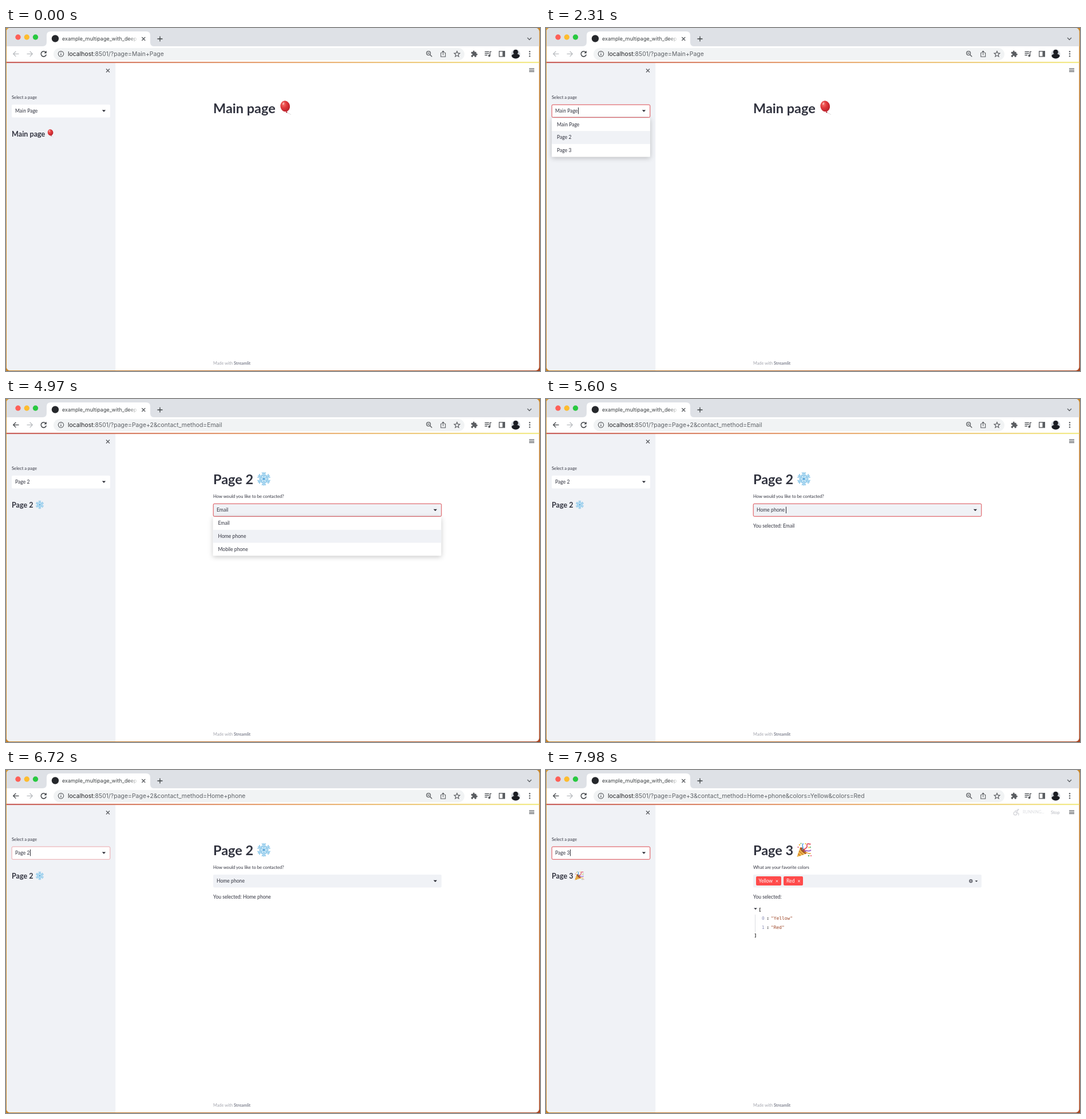
Write an HTML page that moves like this. It is 933x600 px and loops after 8000 ms.

```html
<!DOCTYPE html>
<html lang="en">
<head>
<meta charset="utf-8">
<title>Multipage app</title>
<style>
  html, body { margin: 0; width: 100%; height: 100%; overflow: hidden; background: #c17a26; }
  svg { display: block; width: 933px; height: 600px; }
  text { font-family: Lato, "Open Sans", sans-serif; font-size: 8.6px; fill: #31333f; white-space: pre; }
  .h1 { font-size: 23.5px; font-weight: 700; }
  .h2 { font-size: 12.6px; font-weight: 700; }
  .label { font-size: 7.65px; }
  .foot { font-size: 7.3px; fill: #a3a5ad; }
  .foot .name { font-weight: 700; fill: #808390; }
  .ui { font-family: Inter, Roboto, sans-serif; }
  .url { font-size: 10.45px; fill: #5f6368; }
  .url .host { fill: #202124; }
  .tab { font-size: 9.05px; fill: #3c4043; }
  .mono { font-family: "DejaVu Sans Mono", monospace; font-size: 7.9px; fill: #9c4526; }
  .mono .key { fill: #8b8fb8; }
  .mono .mark { fill: #222; font-weight: 700; }
  .icon { fill: none; stroke: #5a5d61; stroke-width: 1.3; }
  .solid { fill: #5a5d61; stroke: none; }
  .arrow { fill: #262730; }
  .focus { fill: none; stroke: #dc4a50; }
  .caret { stroke: #262730; stroke-width: 1; }
  .menu { filter: drop-shadow(0 2px 4px rgba(0, 0, 0, .22)); }
  .tag { fill: #ff4b4b; }
  .tagText { fill: #fff; }
</style>
</head>
<body>
<svg viewBox="0 0 933 600" xmlns="http://www.w3.org/2000/svg">
  <defs>
    <linearGradient id="desk" x2="1" y2="1">
      <stop stop-color="#d39a3c"/><stop offset=".5" stop-color="#c5842a"/><stop offset="1" stop-color="#a8441f"/>
    </linearGradient>
    <linearGradient id="strip">
      <stop stop-color="#c4504c"/><stop offset=".5" stop-color="#e59a62"/><stop offset="1" stop-color="#f2ea7c"/>
    </linearGradient>
    <linearGradient id="tabFade">
      <stop offset=".1" stop-color="#fff" stop-opacity="0"/><stop offset="1" stop-color="#fff"/>
    </linearGradient>
    <radialGradient id="rubber" cx=".38" cy=".3" r=".75">
      <stop stop-color="#f5736c"/><stop offset=".45" stop-color="#e0393c"/><stop offset="1" stop-color="#b51f2a"/>
    </radialGradient>
    <linearGradient id="gold">
      <stop stop-color="#e9a93a"/><stop offset="1" stop-color="#f8d568"/>
    </linearGradient>
    <clipPath id="win"><rect x="1" width="930.5" height="599" rx="6"/></clipPath>
    <clipPath id="face"><circle cx="890.5" cy="45.5" r="8"/></clipPath>

    <g id="balloon">
      <path d="M12 20C13 24 18 21 19.500 25" fill="none" stroke="#cfcfd2" stroke-width=".8"/>
      <ellipse cx="9.700" cy="9.800" rx="8.300" ry="9.600" fill="url(#rubber)" transform="rotate(-12 9.700 9.800)"/>
      <path d="M10.700 21.500L12 18.500L14 20.800Z" fill="#b51f2a"/>
      <ellipse cx="6.700" cy="5.200" rx="1.500" ry="2.300" fill="#fff" opacity=".45" transform="rotate(25 6.700 5.200)"/>
    </g>
    <g id="arm" fill="none" stroke="#8ac6e9" stroke-width="1.700" stroke-linecap="round">
      <path d="M0 0V-11.200M-2.900 -10.500L0 -7.800L2.900 -10.500M-2.700 -6.800L0 -4.200L2.700 -6.800"/>
      <path d="M0 -1V-10" stroke="#dff2fc" stroke-width=".5"/>
    </g>
    <g id="snow">
      <g transform="translate(12 12)">
        <circle r="8.500" fill="#d9effa"/>
        <use href="#arm"/><use href="#arm" transform="rotate(60)"/><use href="#arm" transform="rotate(120)"/>
        <use href="#arm" transform="rotate(180)"/><use href="#arm" transform="rotate(240)"/><use href="#arm" transform="rotate(300)"/>
        <circle r="2" fill="#5fa9dc"/>
      </g>
    </g>
    <g id="party">
      <path d="M.5 25L6 8.500C11 10 15 14 17 19.500Z" fill="url(#gold)"/>
      <path d="M4 14.500L11.500 21.500M2.300 19.500L6.500 23.200M6 9.500L15.500 19.800" stroke="#c9732c" stroke-width="1.300"/>
      <ellipse cx="11.500" cy="14" rx="7.400" ry="3" fill="#a5552a" transform="rotate(45 11.500 14)"/>
      <g fill="none" stroke-width="1.700" stroke-linecap="round">
        <path d="M10 12C13 9 8 6 11 2" stroke="#4f9ce0"/>
        <path d="M13 13C15 8 19 11 18 5.500S22 3 24 2.500" stroke="#e2495c"/>
        <path d="M14 15C18 12 19 17 24.500 13.500" stroke="#9b5fc8"/>
        <path d="M15 17C19 17 19 20 24 19" stroke="#eda43c"/>
      </g>
      <g fill="#f4bf3f"><circle cx="5" cy="4" r="1.300"/><circle cx="15.500" cy="2" r="1.200"/><circle cx="21.500" cy="8.500" r="1.300"/></g>
      <g fill="#5cae62"><circle cx="7.500" cy="1.500" r="1"/><circle cx="24" cy="8" r="1.100"/><circle cx="21" cy="23" r="1.300"/></g>
      <g fill="#e2495c"><circle cx="2.500" cy="8" r="1.100"/><circle cx="25" cy="23" r="1"/></g>
    </g>
    <path id="down" class="arrow" d="M-3.200 -1.500H3.200L0 1.700Z"/>
    <path id="cross" d="M-3 -3L3 3M3 -3L-3 3"/>
  </defs>

  <rect width="933" height="600" fill="url(#desk)"/>
  <g clip-path="url(#win)">
    <rect width="933" height="600" fill="#fff"/>

    <!-- browser frame -->
    <rect width="933" height="32" fill="#dee1e6"/>
    <circle cx="21" cy="16" r="4.700" fill="#fe5f57"/>
    <circle cx="36.300" cy="16" r="4.700" fill="#febc2e"/>
    <circle cx="51.500" cy="16" r="4.700" fill="#28c840"/>
    <path d="M64 32Q71 32 71 25V13Q71 6 78 6H245Q252 6 252 13V25Q252 32 259 32Z" fill="#fff"/>
    <circle cx="86" cy="18.500" r="6.200" fill="#25272b"/>
    <text class="ui tab" x="98" y="22">example_multipage_with_deep</text>
    <rect x="212" y="10" width="19" height="17" fill="url(#tabFade)"/>
    <rect x="231" y="10" width="5" height="17" fill="#fff"/>
    <g class="icon">
      <use href="#cross" transform="translate(240.300 19)"/>
      <path d="M264.500 19H273.500M269 14.500V23.500" stroke="#3c4043"/>
      <path d="M911 17L914.500 20.500L918 17"/>
    </g>
    <rect x="83" y="35" width="718" height="21.500" rx="10.700" fill="#f1f3f4"/>
    <g class="icon">
      <path id="back" d="M22.500 45.300H13M17.300 40.700L12.700 45.300L17.300 49.900"/>
      <path d="M36.500 45.300H46M41.700 40.700L46.300 45.300L41.700 49.900" stroke="#b9bcc0"/>
      <path d="M69.300 42.300A4.600 4.600 0 1 0 70.300 46.500" stroke="#45484c" stroke-width="1.500"/>
      <path d="M70.800 39.800V44.200H66.400Z" fill="#45484c" stroke="none"/>
      <circle cx="96" cy="45.300" r="4.700" stroke-width="1.100"/>
      <path d="M96 44.700V48M96 42.400V43.600"/>
      <circle cx="738.200" cy="44" r="3.400"/><path d="M740.800 46.700L744.300 50.200M736.600 44H739.800"/>
      <path d="M761.500 43.500H759.800V50.200H767.700V43.500H766M763.700 47.500V40.700M761.500 42.500L763.700 40.300L765.900 42.500" stroke-width="1.100"/>
      <path d="M788 40.500L789.400 43.900L793 44.200L790.200 46.500L791.100 50L788 48.100L784.900 50L785.800 46.500L783 44.200L786.600 43.900Z" stroke-width="1.100"/>
      <path class="solid" transform="translate(811.700 39) scale(.53)" d="M20.500 11H19V7c0-1.100-.9-2-2-2h-4V3.500a2.500 2.500 0 0 0-5 0V5H4c-1.100 0-2 .9-2 2v3.800h1.500c1.490 0 2.700 1.210 2.700 2.700s-1.210 2.700-2.700 2.700H2V20c0 1.100.9 2 2 2h3.800v-1.500c0-1.490 1.210-2.700 2.700-2.700s2.700 1.210 2.700 2.700V22H17c1.100 0 2-.9 2-2v-4h1.500a2.500 2.500 0 0 0 0-5z"/>
      <path d="M836.500 41.500H844M836.500 44.500H844M836.500 47.500H841M845.700 49V41.300H848.200"/>
      <circle class="solid" cx="844.400" cy="48.500" r="1.900"/>
      <rect x="861.700" y="40.700" width="9.600" height="9.200"/>
      <path class="solid" d="M867.500 40.500H872V50H867.500Z"/>
      <g class="solid"><circle cx="915" cy="41.300" r="1.200"/><circle cx="915" cy="45.300" r="1.200"/><circle cx="915" cy="49.300" r="1.200"/></g>
    </g>
    <g clip-path="url(#face)">
      <rect x="882" y="37" width="17" height="17" fill="#d3d7dd"/>
      <g fill="#1a1c22"><circle cx="890.500" cy="42" r="4.300"/><path d="M882 54Q882 45 890.500 45T899 54Z"/></g>
    </g>
    <text class="ui url" x="108" y="49"><tspan class="host">localhost</tspan>:8501/?page=<tspan id="query"></tspan></text>

    <!-- app -->
    <rect y="60" width="191.300" height="540" fill="#f0f2f6"/>
    <rect y="59.200" width="933" height="2" fill="url(#strip)"/>
    <use href="#cross" class="icon" transform="translate(178 74.500)"/>
    <path d="M914 71.200H923M914 73.800H923M914 76.400H923" class="icon" stroke-width="1.200"/>
    <text class="label" x="10" y="124">Select a page</text>
    <rect x="10" y="134" width="172" height="22.500" rx="2" fill="#fff"/>
    <rect id="focus1" class="focus" x="10.200" y="134.200" width="171.600" height="22.100" rx="2"/>
    <text id="value1" x="16" y="148"></text>
    <use href="#down" x="171" y="145"/>
    <path id="caret1" class="caret" d="M.5 139V150.500"/>
    <text id="side" class="h2" x="10" y="189.500"></text>
    <use id="sideIcon"/>
    <text id="title" class="h1" x="362" y="149"></text>
    <use id="titleIcon"/>

    <g id="contact">
      <text class="label" x="362" y="173">How would you like to be contacted?</text>
      <rect x="362" y="183" width="399" height="22.500" rx="2" fill="#f0f2f6"/>
      <rect id="focus2" class="focus" x="362.200" y="183.200" width="398.600" height="22.100" rx="2"/>
      <text id="value2" x="368" y="197.200"></text>
      <use href="#down" x="750" y="194.300"/>
      <path id="caret2" class="caret" d="M.5 188.500V200"/>
      <text id="chosen" x="362" y="225"></text>
    </g>

    <g id="colors">
      <text class="label" x="362" y="173">What are your favorite colors</text>
      <rect x="362" y="183" width="399" height="22.500" rx="2" fill="#f0f2f6"/>
      <rect class="tag" x="367" y="186" width="44" height="16" rx="2"/>
      <rect class="tag" x="415" y="186" width="34" height="16" rx="2"/>
      <text class="tagText" x="371.500" y="197.200">Yellow</text>
      <text class="tagText" x="420" y="197.200">Red</text>
      <g stroke="#fff" stroke-width="1.600">
        <use href="#cross" transform="translate(403.500 194.400) scale(.6)"/>
        <use href="#cross" transform="translate(442 194.400) scale(.6)"/>
      </g>
      <circle cx="742.300" cy="194.300" r="3.200" fill="#6c6e77"/>
      <use href="#cross" stroke="#fff" stroke-width="2" transform="translate(742.300 194.300) scale(.4)"/>
      <use href="#down" transform="translate(752 194.500) scale(.75)"/>
      <text x="362" y="225">You selected:</text>
      <use href="#down" transform="translate(366 242.700) scale(.85)"/>
      <path d="M365.500 253V283" stroke="#dcdde2"/>
      <text class="mono" y="247"><tspan class="mark" x="371.500">[</tspan></text>
      <text class="mono" y="261.500"><tspan class="key" x="377">0</tspan><tspan class="mark" x="385.300">:</tspan><tspan x="393">"Yellow"</tspan></text>
      <text class="mono" y="277.500"><tspan class="key" x="377">1</tspan><tspan class="mark" x="385.300">:</tspan><tspan x="393">"Red"</tspan></text>
      <text class="mono" y="292"><tspan class="mark" x="363.500">]</tspan></text>
    </g>

    <text class="foot" x="362" y="589">Made with <tspan class="name">Streamlit</tspan></text>

    <g id="status">
      <g fill="none" stroke="#d2d3d8" stroke-width="1.200">
        <circle cx="820" cy="76" r="2.900"/>
        <path d="M819 71.500L824 70.500L822.500 74.500L826 76L825.500 79.500"/>
        <circle cx="825" cy="69.300" r=".8"/>
      </g>
      <text x="833" y="75.500" style="font-size:7px;fill:#dcdde1">RUNNING...</text>
      <text x="882" y="76.500" style="font-size:7.800px;fill:#b4b6bd">Stop</text>
    </g>

    <g id="menu1"></g>
    <g id="menu2"></g>
  </g>
</svg>

<script>
const LOOP = 8000, STEP = 70;
const $ = id => document.getElementById(id);

const pages = [
  { name: 'Main Page', title: 'Main page', icon: 'balloon', big: [478, 127], small: [72, 177], scale: .58 },
  { name: 'Page 2', title: 'Page 2', icon: 'snow', big: [438.5, 127.7], small: [51.5, 177.5], scale: .62 },
  { name: 'Page 3', title: 'Page 3', icon: 'party', big: [438, 127], small: [50, 177], scale: .63 }
];
const methods = ['Email', 'Home phone', 'Mobile phone'];

function buildMenu(id, x, y, width, options) {
  const row = 22.67;
  $(id).innerHTML =
    `<rect class="menu" x="${x}" y="${y}" width="${width}" height="${row * 3}" rx="1.5" fill="#fff"/>` +
    `<rect class="hover" x="${x}" y="${y}" width="${width}" height="${row}" fill="#f0f2f6"/>` +
    options.map((o, i) => `<text x="${x + 9}" y="${y + 14.2 + i * row}">${o}</text>`).join('');
  const hover = $(id).querySelector('.hover');
  return i => hover.setAttribute('y', y + i * row);
}
const hover1 = buildMenu('menu1', 10, 157.5, 172, pages.map(p => p.name));
const hover2 = buildMenu('menu2', 361.5, 206.2, 399, methods);
hover2(1);

const ramp = (t, a, b) => Math.min(1, Math.max(0, (t - a) / (b - a)));
const within = (t, a, b) => t >= a && t < b;
// A popover is half drawn for one step on opening and closing.
const popover = (t, a, b) =>
  within(t, a, a + STEP) ? .7 : within(t, a, b) ? 1 : within(t, b, b + STEP) ? .4 : 0;
const pulse = (t, a) => within(t, a, a + STEP) ? 1 : within(t, a + STEP, a + 2 * STEP) ? .5 : 0;

function setText(id, s) { if ($(id).textContent !== s) $(id).textContent = s; }
function setAlpha(id, a) { $(id).setAttribute('opacity', a); }
function setIcon(id, icon, [x, y], scale) {
  $(id).setAttribute('href', '#' + icon);
  $(id).setAttribute('transform', `translate(${x} ${y}) scale(${scale})`);
}
function setCaret(id, x, on) {
  $(id).setAttribute('transform', `translate(${x})`);
  setAlpha(id, on ? 1 : 0);
}

function draw(now) {
  const t = Math.floor(now % LOOP / STEP) * STEP;
  const picked = t < 3080 ? 0 : t < 7770 ? 1 : 2;
  const shown = t < 3220 ? 0 : t < 7910 ? 1 : 2;
  const value = methods[t < 5530 ? 0 : 1];
  const method = methods[t < 5670 ? 0 : 1];
  const page = pages[shown];

  const query = page.name.replace(' ', '+') +
    (shown ? '&contact_method=' + method.replace(' ', '+') : '') +
    (shown === 2 ? '&colors=Yellow&colors=Red' : '');
  setText('query', query);
  $('back').style.stroke = shown ? '#45484c' : '#b9bcc0';

  setText('value1', pages[picked].name);
  setText('side', page.title);
  setText('title', page.title);
  setIcon('titleIcon', page.icon, page.big, 1);
  setIcon('sideIcon', page.icon, page.small, page.scale);

  setAlpha('contact', shown === 1 ? 1 : 0);
  setAlpha('colors', shown === 2 ? 1 : 0);
  setText('value2', value);
  setText('chosen', 'You selected: ' + method);

  setAlpha('focus1', ramp(t, 1160, 1370) - ramp(t, 4110, 4280) + ramp(t, 6620, 6830));
  setAlpha('focus2', ramp(t, 4240, 4450) - ramp(t, 6480, 6650));
  setCaret('caret1', picked ? 42 : 56,
    within(t, 1260, 1820) || within(t, 2310, 2870) || within(t, 3080, 3640) ||
    within(t, 6720, 7210) || t >= 7770);
  setCaret('caret2', t < 5530 ? 391 : 419,
    within(t, 4340, 4830) || within(t, 5250, 6090));

  hover1(t < 5000 ? 1 : 2);
  setAlpha('menu1', popover(t, 1330, 3080) + popover(t, 6790, 7770));
  setAlpha('menu2', popover(t, 4410, 5530));
  setAlpha('status', pulse(t, 3290) + pulse(t, 5740) + pulse(t, 7980));
}

function tick() {
  draw(performance.now());
  requestAnimationFrame(tick);
}
tick();
</script>
</body>
</html>
```
